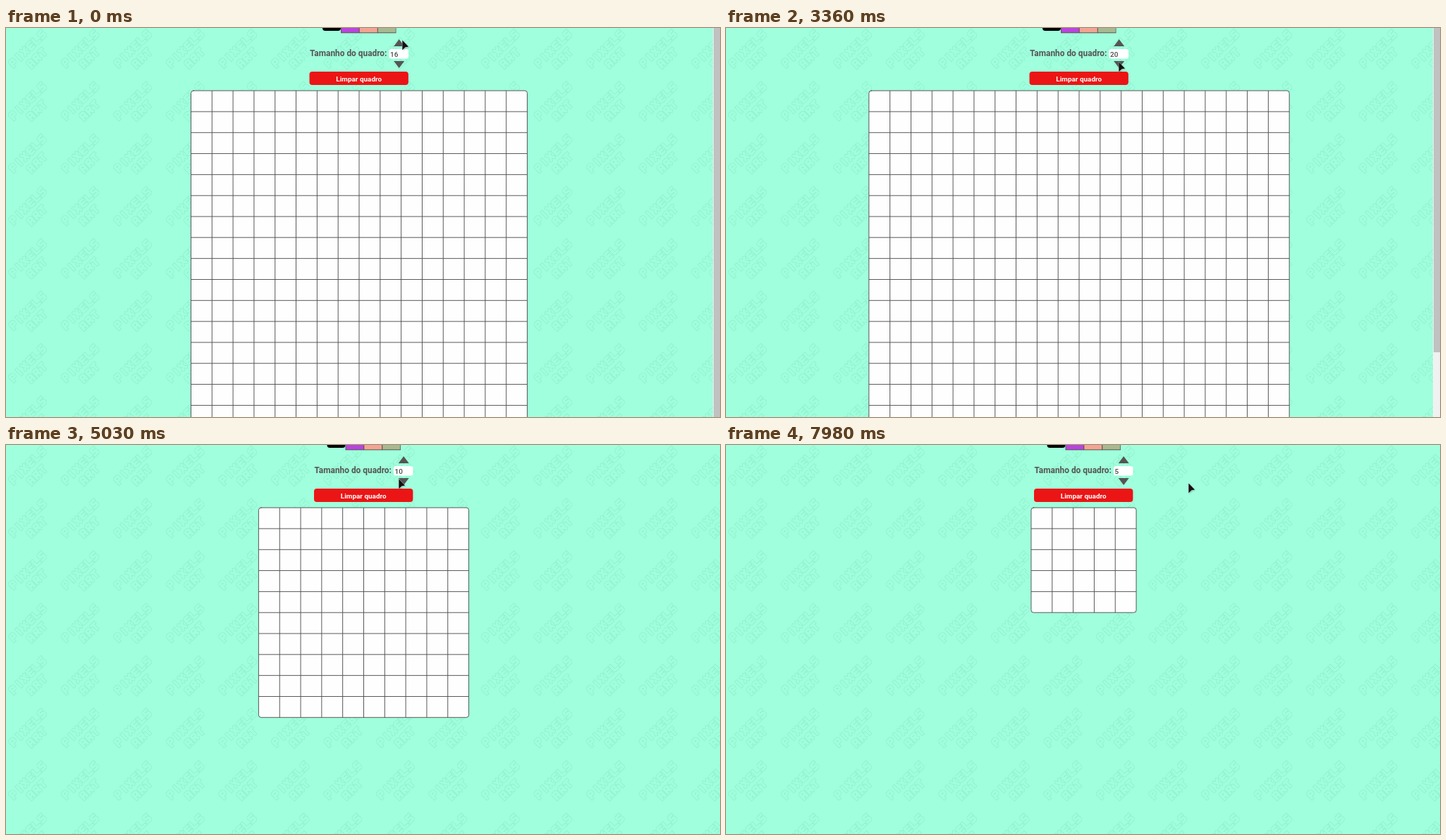
An HTML page with a canvas that plays this animation: 1013x553 px, repeating every 8000 ms.

```html
<!DOCTYPE html>
<html lang="pt-BR">
<head>
<meta charset="utf-8">
<title>Quadro de pixels</title>
<style>
  html, body { margin: 0; width: 100%; height: 100%; overflow: hidden; background: #a0ffdc; }
  canvas { display: block; }
</style>
</head>
<body>
<canvas id="stage" width="1013" height="553"></canvas>
<script>
const ctx = document.getElementById('stage').getContext('2d');
const W = 1013, H = 553, LOOP = 8000, TICK = 120;
const SCALE = 0.7455, CELL = 40 * SCALE, TILE = 100 * SCALE;
const BOARD_TOP = 89.1, CENTER = 501, NO_BAR_SHIFT = 6.5, SCROLL = 124.4;
const MINT = '#a0ffdc', INK = '#505050';

// Evenly spaced clicks on the size arrows
const clickRuns = [
  { first: 520, last: 640, count: 2, change: 1 },
  { first: 1140, last: 1420, count: 2, change: 1 },
  { first: 3510, last: 4290, count: 6, change: -1 },
  { first: 4540, last: 5030, count: 4, change: -1 },
  { first: 5410, last: 6050, count: 5, change: -1 }
];

// Each move eases to (x, y), one position per tick
const moves = [
  { start: 890, ticks: 1, x: 557, y: 17 },
  { start: 1670, ticks: 2, x: 621, y: 124 },
  { start: 1930, ticks: 3, x: 605, y: 150 },
  { start: 2860, ticks: 2, x: 549, y: 80 },
  { start: 3120, ticks: 3, x: 557, y: 48 },
  { start: 6860, ticks: 2, x: 552, y: 66 },
  { start: 7100, ticks: 2, x: 550, y: 33 },
  { start: 7370, ticks: 6, x: 656, y: 54 }
];

function boardSize(t) {
  return clickRuns.reduce((size, { first, last, count, change }) => {
    if (t < first) return size;
    const clicks = 1 + Math.floor((t - first) * (count - 1) / (last - first));
    return size + change * Math.min(count, clicks);
  }, 16);
}

function pointerAt(t) {
  let x = 562, y = 17;
  for (const move of moves) {
    if (t < move.start) break;
    const tick = Math.floor((t - move.start) / TICK) + 1;
    const p = Math.min(1, tick / move.ticks);
    const eased = p * p * (3 - 2 * p);
    x += (move.x - x) * eased;
    y += (move.y - y) * eased;
  }
  return [x, y];
}

// Letter skeletons on a 6 by 9 grid, drawn as thick outlined strokes
const letters = {
  P: 'M0 9V0H6V5H0', I: 'M3 0V9', X: 'M0 0L6 9M6 0L0 9', E: 'M6 0H0V9H6M0 4.5H5',
  L: 'M0 0V9H6', S: 'M6 0H0V4.5H6V9H0', A: 'M0 9V0H6V9M0 5H6',
  R: 'M0 9V0H6V5H0M3 5L6 9', T: 'M0 0H6M3 0V9'
};

const motif = new Path2D();
function addWord(word, y) {
  const pitch = 11.4;
  [...word].forEach((letter, i) => {
    const x = (i - word.length / 2) * pitch + 2.7;
    motif.addPath(new Path2D(letters[letter]), new DOMMatrix().translate(x, y));
  });
}
addWord('PIXELS', -4.5);
addWord('ART', 14);

function drawBackground(scroll) {
  ctx.fillStyle = MINT;
  ctx.fillRect(0, 0, W, H);
  ctx.lineJoin = 'bevel';
  ctx.lineCap = 'square';
  for (let y = 29.5 - scroll % TILE - TILE; y < H + TILE; y += TILE) {
    for (let x = 30.5; x < W + TILE; x += TILE) {
      ctx.save();
      ctx.translate(x, y);
      ctx.rotate(-Math.PI / 4);
      for (const [width, color] of [[5, '#90f1cf'], [3.3, MINT]]) {
        ctx.lineWidth = width;
        ctx.strokeStyle = color;
        ctx.stroke(motif);
      }
      ctx.restore();
    }
  }
}

function box(x, y, w, h, radius, color) {
  ctx.fillStyle = color;
  ctx.beginPath();
  ctx.roundRect(x, y, w, h, radius);
  ctx.fill();
}

function polygon(color, ...points) {
  ctx.fillStyle = color;
  ctx.beginPath();
  points.forEach(([x, y]) => ctx.lineTo(x, y));
  ctx.closePath();
  ctx.fill();
}

function text(value, x, y, font, color, align = 'center') {
  ctx.font = `${font} Roboto, sans-serif`;
  ctx.fillStyle = color;
  ctx.textAlign = align;
  ctx.fillText(value, x, y);
}

function arrow(base, tip) {
  const x = 557.7, half = 7.5;
  polygon('#555', [x - half, base], [x + half, base], [x, tip]);
}

function drawControls(size) {
  box(449, -20, 26, 24, 4, '#000');
  ['#bb44dd', '#f3a493', '#a8b992'].forEach((color, i) => {
    const x = 475 + i * 26;
    box(x, -20, 26.5, 27.3, 0, '#5b5550');
    box(x + 0.8, -20, 25, 26.3, 0, color);
  });
  text('Tamanho do quadro:', 485.7, 40.4, '600 11.9px', '#555');
  box(543.5, 30, 27.5, 13.5, 3, '#fff');
  text(size, 545, 40.5, '500 9.94px', '#444', 'left');
  arrow(26, 16);
  arrow(47, 57);
  box(430.5, 62, 140.4, 19, 4, '#eb1515');
  text('Limpar quadro', 500.7, 75.5, 'bold 9.94px', '#fff');
}

function drawBoard(size, center, scroll) {
  const side = size * CELL, line = 0.95;
  const left = center - side / 2, top = BOARD_TOP - scroll;
  box(left, top, side, side, 4, '#fefefe');
  ctx.fillStyle = ctx.strokeStyle = INK;
  for (let i = 1; i < size; i++) {
    const offset = i * CELL - line / 2;
    ctx.fillRect(left + offset, top, line, side);
    ctx.fillRect(left, top + offset, side, line);
  }
  ctx.lineWidth = line;
  ctx.beginPath();
  ctx.roundRect(left, top, side, side, 3.5);
  ctx.stroke();
}

function drawScrollbar(size, scrolled) {
  const end = scrolled ? H : Math.min(H, 461 + (20 - size) * 23);
  box(1003, 0, 10, H, 0, '#f1f1f1');
  box(1004, 0, 9, end, 0, '#c1c1c1');
}

function drawPointer(x, y) {
  const shape = [[0.4, 0.6], [9, 9.6], [4.4, 10.2], [0.4, 14.2]];
  ctx.save();
  ctx.translate(x, y);
  ctx.shadowColor = 'rgba(0,0,0,.3)';
  ctx.shadowBlur = 2;
  ctx.shadowOffsetX = ctx.shadowOffsetY = 1;
  polygon('#111', ...shape);
  ctx.shadowColor = 'transparent';
  ctx.strokeStyle = 'rgba(255,255,255,.6)';
  ctx.lineWidth = 1.2;
  ctx.stroke();
  polygon('#111', ...shape);
  ctx.restore();
}

let lastState = '';
function render(now) {
  const t = now % LOOP;
  const size = boardSize(t);
  const [px, py] = pointerAt(t);
  const scroll = t >= 1930 && t < 2470 ? SCROLL : 0;
  const state = [size, px, py, scroll].join();
  if (state !== lastState) {
    lastState = state;
    const hasBar = size > 15;
    const shift = hasBar ? 0 : NO_BAR_SHIFT;
    drawBackground(scroll);
    ctx.save();
    ctx.translate(shift, -scroll);
    drawControls(size);
    ctx.restore();
    drawBoard(size, CENTER + shift, scroll);
    if (hasBar) drawScrollbar(size, scroll > 0);
    drawPointer(px, py);
  }
  requestAnimationFrame(() => render(performance.now() - start));
}

const start = performance.now();
render(0);
</script>
</body>
</html>
```
